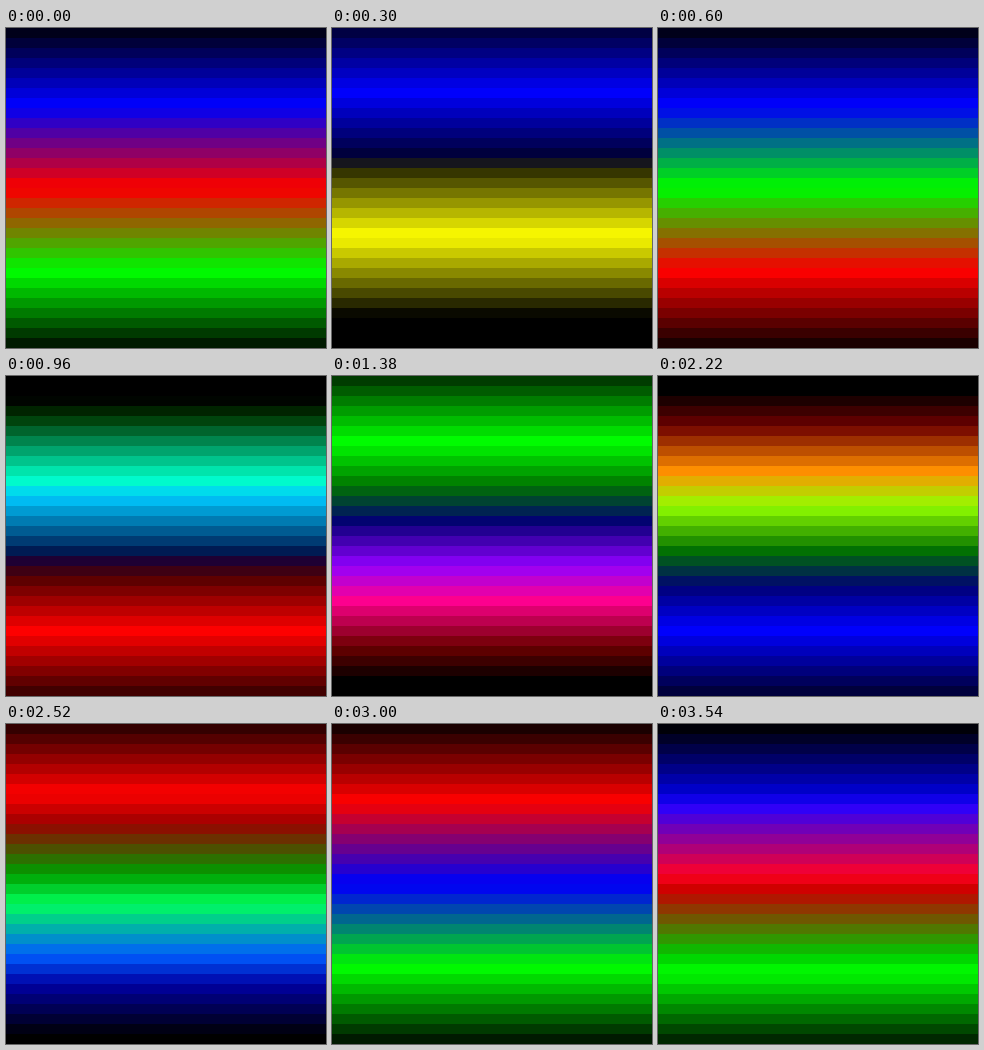
These frames come from a looping animation (320x320 px, 3.6 s). An HTML page with a canvas:

```html
<!DOCTYPE html>
<html lang="en">
<head>
<meta charset="utf-8">
<title>Colour bars</title>
<style>
  html, body { margin: 0; height: 100%; overflow: hidden; background: #000; }
  canvas { display: block; }
</style>
</head>
<body>
<canvas id="stage" width="320" height="320"></canvas>
<script>
const ctx = document.getElementById('stage').getContext('2d');
const ROWS = 32, ROW_HEIGHT = 10, STEP = 60, STEPS = 60;
const SWING = ROWS * 0.3, REACH = ROWS / 4;

// Each channel is one bar, a third of a cycle apart.
const barCentre = (step, channel) =>
  ROWS / 2 + SWING * Math.sin(2 * Math.PI * (step / STEPS + channel / 3));

function draw(step) {
  const centres = [0, 1, 2].map(channel => barCentre(step, channel));
  for (let row = 0; row < ROWS; row++) {
    const rgb = centres.map(centre =>
      Math.round(255 * Math.max(0, 1 - Math.abs(row + 0.5 - centre) / REACH)));
    ctx.fillStyle = `rgb(${rgb})`;
    ctx.fillRect(0, row * ROW_HEIGHT, 320, ROW_HEIGHT);
  }
}

const start = performance.now();
function tick() {
  draw(Math.floor((performance.now() - start) / STEP) % STEPS);
  requestAnimationFrame(tick);
}
tick();
</script>
</body>
</html>
```
